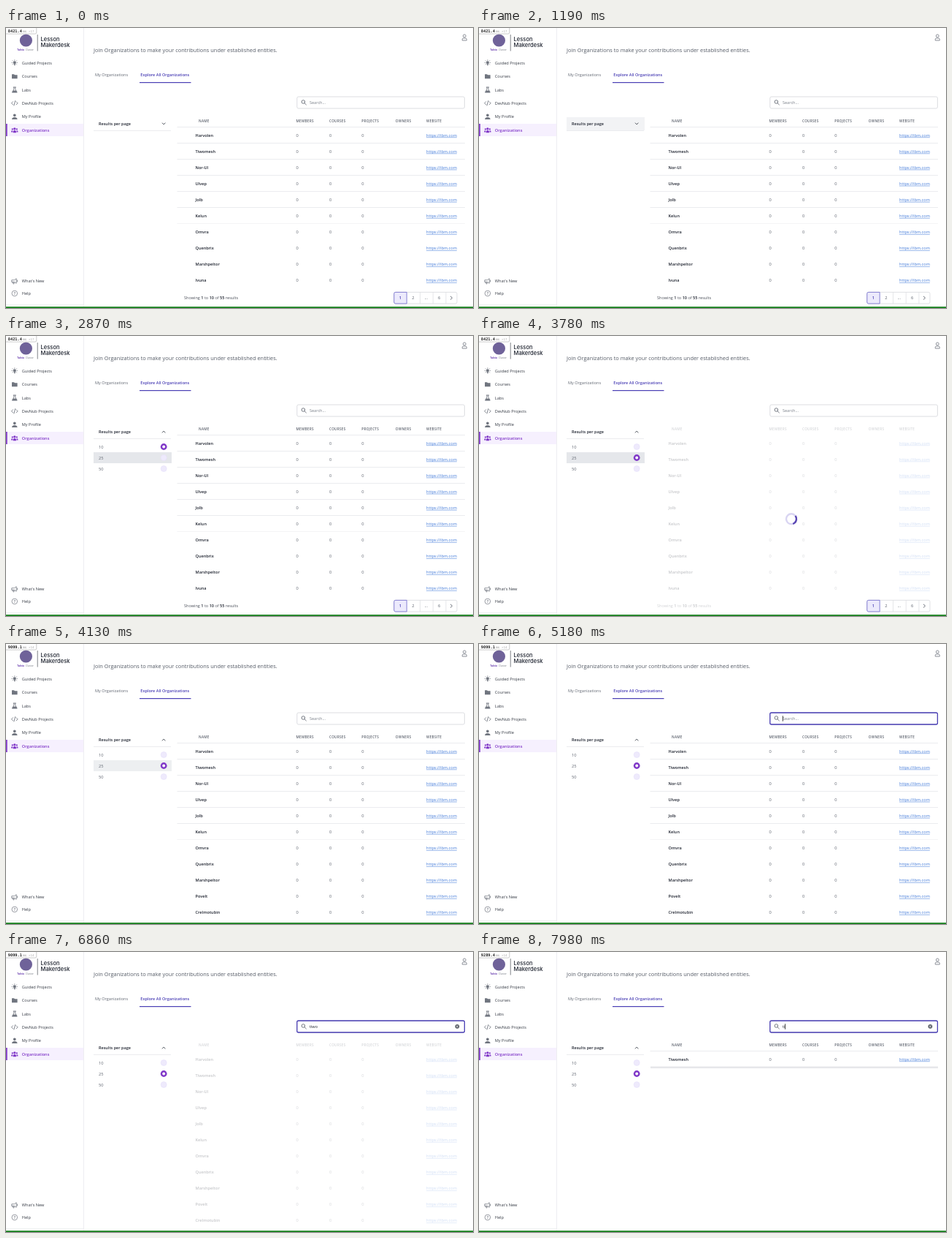
An HTML page with a canvas for the animation above (8 s loop, 640 px wide and 383 px high).

```html
<!DOCTYPE html>
<html lang="en">
<head>
<meta charset="utf-8">
<title>Organizations</title>
<style>
  html, body { margin: 0; width: 100%; height: 100%; overflow: hidden; background: #fff; }
  canvas { display: block; width: 640px; height: 383px; }
</style>
</head>
<body>
<canvas id="stage"></canvas>
<script>
const W = 640, H = 383, LOOP = 8000, TICK = 70;
const SANS = '"Open Sans", "Noto Sans", sans-serif';
const GEO = 'Inter, sans-serif';
const MONO = '"DejaVu Sans Mono", monospace';
const INK = '#1f2430', GRAY = '#5f6570', VIOLET = '#8038c8', INDIGO = '#4a3fb5', LINE = '#e3e4e8';

const canvas = document.getElementById('stage');
const ctx = canvas.getContext('2d');
const dpr = window.devicePixelRatio || 1;
canvas.width = W * dpr;
canvas.height = H * dpr;

const orgs = ['Harvolen', 'Tiwomesh', 'Nor-Ul', 'Ulvep', 'Jolb', 'Kelun', 'Omvra', 'Quenbrix', 'Marshpeltor'];
const shortList = [...orgs, 'Ivuna'];
const longList = [...orgs, 'Povelt', 'Crelmotubin'];
const columns = [['MEMBERS', 397.5], ['COURSES', 443], ['PROJECTS', 487.3], ['OWNERS', 533.8], ['WEBSITE', 576]];

// Value typed in the search box from each time on
const typing = [[0, ''], [5600, 't'], [5880, 'ti'], [6020, 'tiw'], [6300, 'tiwo'], [7630, 'tiw'], [7980, 'ti']];
// Caret visibility from each time on
const blink = [[0, false], [4760, true], [5320, false], [5600, true], [6860, false], [7350, true]];

const latest = (list, t) => list.filter(([at]) => at <= t).pop()[1];
const ramp = (t, from, to) => Math.min(1, Math.max(0, (t - from) / (to - from)));
const between = (t, from, to) => t >= from && t < to;

function text(s, x, y, size, color = INK, weight = 400, opt = {}) {
  ctx.font = `${weight} ${size}px ${opt.font || SANS}`;
  ctx.letterSpacing = (opt.spacing || 0) + 'px';
  ctx.textAlign = opt.align || 'left';
  ctx.fillStyle = color;
  ctx.fillText(s, x, y);
  return ctx.measureText(s).width;
}

function rect(x, y, w, h, color) {
  ctx.fillStyle = color;
  ctx.fillRect(x, y, w, h);
}

function box(x, y, w, h, r, fill, stroke, width = 0.7) {
  ctx.beginPath();
  ctx.roundRect(x, y, w, h, r);
  paint(fill, stroke, width);
}

function disc(x, y, r, fill, stroke, width) {
  ctx.beginPath();
  ctx.arc(x, y, r, 0, 7);
  paint(fill, stroke, width);
}

function paint(fill, stroke, width) {
  if (fill) { ctx.fillStyle = fill; ctx.fill(); }
  if (stroke) { ctx.strokeStyle = stroke; ctx.lineWidth = width; ctx.stroke(); }
}

function shape(x, y, d, fill, stroke, width = 0.9) {
  ctx.save();
  ctx.translate(x, y);
  ctx.lineCap = ctx.lineJoin = 'round';
  const path = new Path2D(d);
  if (fill) { ctx.fillStyle = fill; ctx.fill(path); }
  if (stroke) { ctx.strokeStyle = stroke; ctx.lineWidth = width; ctx.stroke(path); }
  ctx.restore();
}

// Whitens an area so that what lies there looks faded
const veil = (x, y, w, h, k) => rect(x, y, w, h, `rgba(255, 255, 255, ${k})`);

const person = 'M-1.9 -1.9a1.9 1.9 0 1 0 3.8 0a1.9 1.9 0 1 0 -3.8 0M-3.8 3.9C-3.8 -0.1 3.8 -0.1 3.8 3.9Z';
const icons = {
  bulb(y, c) {
    disc(11.8, y - 0.4, 2, c);
    shape(11.8, y, 'M-0.9 1.5h1.8v1.9h-1.8Z', c);
    shape(11.8, y, 'M0 -4V-3.4M-3.8 -0.4H-3.3M3.8 -0.4H3.3M-2.7 -3L-2.3 -2.6M2.7 -3L2.3 -2.6M-2.7 2.2L-2.3 1.8M2.7 2.2L2.3 1.8', null, c, 0.8);
  },
  folder(y, c) { shape(11.8, y, 'M-3.8 -2.9H-0.8L0.2 -1.9H3.8V3H-3.8Z', c); },
  flask(y, c) {
    shape(11.8, y, 'M-1.6 -3.6H1.6M-1 -3.4V-0.8L-3.4 3.5H3.4L1 -0.8V-3.4', null, c);
    shape(11.8, y, 'M-1.9 1H1.9L3.3 3.5H-3.3Z', c);
  },
  code(y, c) { shape(11.8, y, 'M-2.3 -2L-4.3 0L-2.3 2M2.3 -2L4.3 0L2.3 2M0.9 -3.2L-0.9 3.2', null, c); },
  person(y, c) { shape(11.8, y, person, c); },
  group(y, c) {
    disc(11.8, y - 1.8, 1.6, c);
    disc(8.8, y - 1.2, 1.1, c);
    disc(14.8, y - 1.2, 1.1, c);
    shape(11.8, y, 'M-2.1 3.7V1.6Q0 -0.6 2.1 1.6V3.7ZM-4.6 3V1.4Q-3.4 0 -2.7 1V3ZM4.6 3V1.4Q3.4 0 2.7 1V3Z', c);
  },
  horn(y, c) { shape(11.8, y, 'M-3.6 -1.4H-0.4L2.4 -3.4V3L-0.4 1.3H-3.6ZM-2.6 1.4L-2 3.7H-0.7V1.4M3.8 -1.2V0.8', null, c, 0.8); },
  help(y, c) {
    disc(11.8, y, 3.8, null, c, 0.7);
    text('?', 11.8, y + 2, 5.6, c, 600, { align: 'center' });
  }
};

const menu = [
  ['bulb', 'Guided Projects', 47.7], ['folder', 'Courses', 66.2], ['flask', 'Labs', 84.6],
  ['code', 'DevNub Projects', 102.8], ['person', 'My Profile', 121.2], ['group', 'Organizations', 139.6],
  ['horn', "What's New", 346.2], ['help', 'Help', 363]
];

function sidebar() {
  rect(106, 0, 0.8, 381, '#e9e9ee');
  rect(0, 378, 106, 0.6, '#ececf0');
  rect(0, 131, 106, 17, '#f6f0fe');
  rect(0, 131, 1.7, 17, VIOLET);
  disc(27.4, 17, 8.6, '#6f6299');
  text('Talvio', 15.3, 30.8, 3.4, '#6a3fb0', 700);
  text('Cluster', 26.8, 30.8, 3.4, '#70757f');
  rect(42.8, 9, 0.7, 22.5, '#4b4f58');
  text('Lesson', 47.5, 18.2, 7.6, INK, 500, { font: GEO });
  text('Makerdesk', 47.5, 25.6, 7.6, INK, 500, { font: GEO });
  for (const [icon, label, y] of menu) {
    const on = icon === 'group';
    icons[icon](y, on ? VIOLET : '#70757f');
    text(label, 21.8, y + 2, 5.6, on ? VIOLET : '#343943', on ? 600 : 500);
  }
}

function badge(t) {
  const [ms, count] = t < 4130 ? ['8421.4', '×17'] : t < 7070 ? ['9099.1', '×14'] : ['9289.4', '×14'];
  box(-2, -2, 43.8, 10, 2, '#fff', '#b5b5b5', 0.7);
  text(ms, 2.8, 5.7, 5.3, '#222', 700, { font: MONO });
  text('ms', 23.2, 5.7, 4.2, '#888', 400, { font: MONO });
  text(count, 31, 5.7, 4.2, '#b0b0b0', 400, { font: MONO });
}

function heading() {
  text('Join Organizations to make your contributions under established entities.', 120, 33, 7.42, '#555b66');
  text('My Organizations', 122, 66, 5.55, GRAY, 500);
  text('Explore All Organizations', 184.3, 66, 5.55, INDIGO, 600);
  rect(183, 74, 70.5, 1.2, INDIGO);
  disc(628.3, 10.8, 1.9, null, '#70757f', 0.8);
  shape(628.3, 13, 'M-3 3.6V2.4Q-3 1 -1.6 1H1.6Q3 1 3 2.4V3.6Z', null, '#70757f', 0.8);
}

function search(t) {
  const focus = ramp(t, 4620, 4760);
  const value = latest(typing, t);
  box(398.8, 94, 229.6, 16, 2, '#fff', '#d3d5da', 0.8);
  if (focus) box(398.8, 94, 229.6, 16, 2, null, `rgba(74, 63, 181, ${focus})`, 1.3);
  disc(407.4, 101, 2.3, null, '#666b75', 0.9);
  shape(407.4, 101, 'M1.7 1.7L4 4', null, '#666b75', 0.9);
  const width = value
    ? text(value, 415.9, 104, 5.6, INK)
    : (text('Search...', 415.9, 104, 5.6, '#7b808a'), 0);
  if (latest(blink, t)) rect(415.9 + width, 98.3, 0.8, 7.4, '#111');
  if (value) {
    disc(618.4, 101.8, 2.9, '#565b64');
    shape(618.4, 101.8, 'M-1 -1L1 1M1 -1L-1 1', null, '#fff', 0.8);
  }
}

function radio(y, on) {
  if (on) {
    disc(216.2, y, 4.4, VIOLET);
    disc(216.2, y, 1.9, '#fff');
  } else {
    disc(216.2, y, 4, '#eeeafc', '#e6e0fa', 0.6);
  }
}

function panel(t) {
  const open = 1 - (1 - ramp(t, 2030, 2240)) ** 1.7;
  const hover = [
    [122, 18, ramp(t, 1120, 1260) - ramp(t, 2380, 2590)],
    [144, 15, ramp(t, 2380, 2590) - ramp(t, 2660, 2870)],
    [159, 15, ramp(t, 2660, 2870) - ramp(t, 4060, 4270)]
  ];
  rect(120, 140, 106, 0.7, LINE);
  for (const [y, h, k] of hover) {
    if (k > 0) rect(120, y, 107, h, `rgba(229, 231, 235, ${k})`);
  }
  text('Results per page', 127, 133.1, 5.5, INK, 600);
  ctx.save();
  ctx.translate(216.2, 131);
  ctx.rotate(Math.PI * open);
  shape(0, 0, 'M-1.9 -1L0 0.9L1.9 -1', null, '#343943', 0.9);
  ctx.restore();
  if (!open) return;
  const chosen = t < 3290 ? 0 : 1;
  ['10', '25', '50'].forEach((n, i) => {
    const y = 151.5 + 15 * i;
    text(n, 127, y + 2.1, 5.7, GRAY);
    radio(y, i === chosen);
  });
  if (open < 1) veil(120, 144, 107, 46, 0.4 * (1 - open));
}

function row(name, y) {
  text(name, 259.5, y + 2.1, 5.6, INK, 600);
  for (const x of [397.5, 443, 487.3]) text('0', x, y + 2.1, 5.7, GRAY);
  const w = text('https://ibm.com', 576, y + 2.1, 5.6, '#3f78d8');
  rect(576, y + 3, w, 0.5, '#3f78d8');
}

function table(t) {
  const found = t >= 7070;
  const busy = between(t, 3290, 4130) || between(t, 6860, 7070);
  const list = found ? [orgs[1]] : t < 4130 ? shortList : longList;
  const lines = found ? 1 : 7;
  text('NAME', 264, 128.8, 4.7, GRAY, 600, { spacing: 0.25 });
  for (const [label, x] of columns) text(label, x, 128.8, 4.7, GRAY, 600, { spacing: 0.25 });
  list.forEach((name, i) => row(name, 146.6 + 22.06 * i));
  if (!busy) {
    for (let i = 0; i < lines; i++) rect(234.5, 135.2 + 22 * i, 394.5, 0.7, i === 6 ? '#f0f0f3' : LINE);
  }
  if (found) {
    const shade = ctx.createLinearGradient(0, 156.6, 0, 160);
    shade.addColorStop(0, '#d5d6db');
    shade.addColorStop(1, '#ffffff');
    rect(235, 156.8, 394, 3.2, shade);
  }
  if (t < 4130) summary();
  if (busy) veil(234, 115, 396, 266, 0.75);
  if (t < 4130) pages();
  if (between(t, 3290, 4130)) spinner(t);
}

function summary() {
  let x = 244;
  'Showing 1 to 10 of 55 results'.split(' ').forEach(word => {
    const bold = /\d/.test(word);
    x += text(word, x, 371, 5.55, bold ? INK : '#4b505a', bold ? 600 : 400);
    x += text(' ', x, 371, 5.55);
  });
}

function pages() {
  box(531.8, 361.4, 86.2, 15.6, 2, '#fff', '#d3d5da');
  for (const x of [567, 584.8, 602.6]) rect(x, 361.4, 0.7, 15.6, '#d9dbe0');
  box(531.8, 361.4, 17.4, 15.6, [2, 0, 0, 2], '#eceafc', '#7b75d0', 0.9);
  const mid = { align: 'center' };
  text('1', 540.5, 371.3, 5.8, INDIGO, 600, mid);
  text('2', 558, 371.3, 5.8, GRAY, 500, mid);
  text('...', 575.8, 371.3, 5.8, GRAY, 500, mid);
  text('6', 593.6, 371.3, 5.8, GRAY, 500, mid);
  shape(610.4, 369.2, 'M-1.1 -2.1L1.1 0L-1.1 2.1', null, '#555b66', 0.9);
}

function spinner(t) {
  const mid = 0.3 + (t - 3780) / 1000 * 2 * Math.PI;
  disc(428, 250.3, 7, null, '#d9d5f2', 2.4);
  ctx.beginPath();
  ctx.arc(428, 250.3, 7, mid - 0.95, mid + 0.95);
  paint(null, '#5a48b4', 2.4);
}

function render(now) {
  const t = Math.floor((now % LOOP) / TICK) * TICK;
  ctx.setTransform(dpr, 0, 0, dpr, 0, 0);
  rect(0, 0, W, H, '#fff');
  sidebar();
  heading();
  panel(t);
  table(t);
  search(t);
  rect(0, 381.2, W, 1.8, '#17801d');
  badge(t);
}

let start;
function frame(now) {
  start ??= now;
  render(now - start);
  requestAnimationFrame(frame);
}
render(0);
requestAnimationFrame(frame);
</script>
</body>
</html>
```
